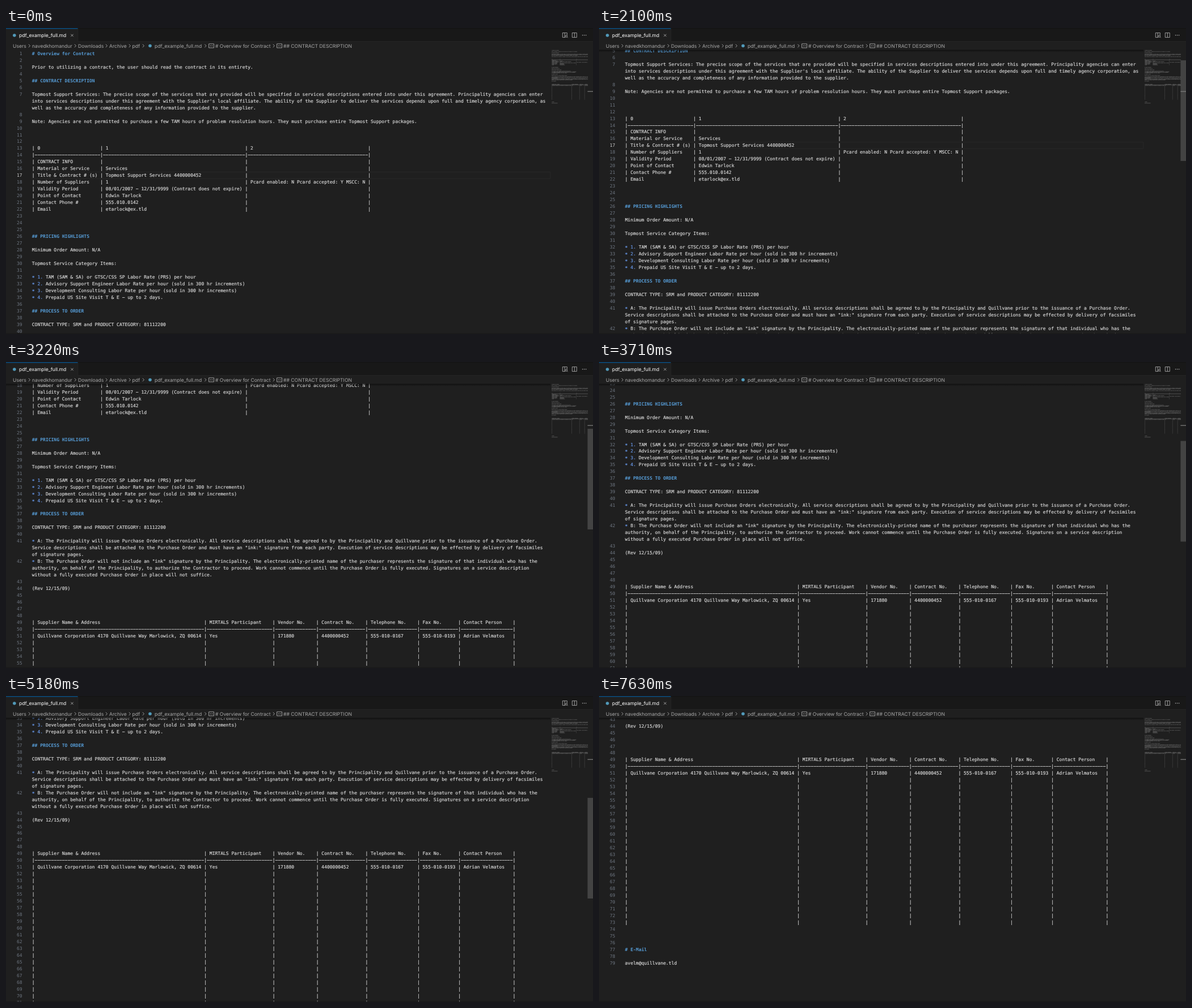
Animation, 1035 px wide and 541 px high, one loop 8260 ms. Source, as an HTML page:

```html
<!DOCTYPE html>
<html lang="en">
<head>
<meta charset="utf-8">
<title>Markdown editor scroll</title>
<style>
  html, body { margin: 0; width: 100%; height: 100%; overflow: hidden; background: #1f1f1f; }
  svg { display: block; width: 100%; height: 100%; }
  text { white-space: pre; text-rendering: geometricPrecision; }
  .mono {
    font: 8px "DejaVu Sans Mono", "Liberation Mono", monospace;
    color: #d8d8d8; fill: currentColor; stroke: currentColor; stroke-width: .18;
  }
  .mono tspan { fill: currentColor; stroke: currentColor; }
  .head { font-weight: bold; color: #569cd6; stroke: none; }
  .num { color: #6e7681; stroke: none; text-anchor: end; }
  .ui { font: 8.6px Inter, "Open Sans", sans-serif; fill: #a9a9a9; }
  .icon { fill: none; stroke: #bdbdbd; stroke-width: .8; }
</style>
</head>
<body>
<svg viewBox="0 0 1035 541" preserveAspectRatio="none">
  <defs>
    <clipPath id="view"><rect y="38.7" width="1025" height="503"/></clipPath>
    <clipPath id="mapView"><rect x="961" y="38" width="65" height="110"/></clipPath>
    <linearGradient id="fade" x2="0" y2="1">
      <stop stop-color="#000" stop-opacity=".5"/>
      <stop offset="1" stop-color="#000" stop-opacity="0"/>
    </linearGradient>
  </defs>
  <rect width="1035" height="541" fill="#1f1f1f"/>
  <g clip-path="url(#view)"><g id="page"></g></g>
  <rect id="shadow" y="38.7" width="960" height="4" fill="url(#fade)"/>
  <g id="map" clip-path="url(#mapView)" fill="none" stroke="#ccc" stroke-opacity=".36" stroke-width=".8"></g>
  <rect id="slider" x="1025.4" width="9.6" height="178" fill="#797979" fill-opacity=".4"/>
  <rect x="1025.4" y="111.6" width="9.6" height="1.2" fill="#808080"/>
  <g id="bar">
    <rect width="1035" height="24" fill="#181818"/>
    <rect y="23.5" width="1035" height=".7" fill="#2b2b2b"/>
    <rect width="126.5" height="24.3" fill="#1f1f1f"/>
    <rect x="126.5" width=".7" height="24" fill="#2b2b2b"/>
    <rect width="1035" height=".7" fill="#101010"/>
    <rect y=".4" width="126.5" height="1" fill="#0067b5"/>
    <path class="icon" d="M114.3 10.8l4.4 4.4m0-4.4l-4.4 4.4"/>
    <path class="icon" d="M981.3 8.6h8v4m-4.2-4v8m1.2 0h-5v-8"/>
    <circle class="icon" cx="988" cy="14.4" r="1.7"/>
    <path class="icon" d="M989.2 15.7l1.3 1.5M998.3 8.6h8v8h-8zm4 0v8"/>
    <g fill="#bdbdbd">
      <circle cx="1016.6" cy="12.8" r=".8"/><circle cx="1019.6" cy="12.8" r=".8"/><circle cx="1022.6" cy="12.8" r=".8"/>
    </g>
  </g>
  <rect y="540" width="1035" height="1" fill="#181818"/>
</svg>
<script>
const LOOP = 8260, STEP = 70;
const ROW = 11.975, LEFT = 45.8, BASE = 47.8;
const MAP_X = 962, MAP_Y = 39.6, MAP_CHAR = .556, MAP_ROW = 1.11;

const $ = id => document.getElementById(id);

function add(parent, tag, attrs = {}, text) {
  const el = document.createElementNS("http://www.w3.org/2000/svg", tag);
  for (const key in attrs) el.setAttribute(key, attrs[key]);
  if (text !== undefined) el.textContent = text;
  parent.appendChild(el);
  return el;
}

const tableRow = (widths, cells = []) =>
  widths.map((w, i) => ("| " + (cells[i] || "")).padEnd(w)).join("") + "|";
const ruleRow = widths => widths.map(w => "|" + "\u2212".repeat(w - 1)).join("") + "|";
const blanks = n => Array(n).fill("");

const info = [25, 53, 45];
const vendor = [63, 25, 16, 18, 19, 15, 20];

// A nested array is one numbered line wrapped over several rows.
const lines = [
  "# Overview for Contract", "",
  "Prior to utilizing a contract, the user should read the contract in its entirety.", "",
  "## CONTRACT DESCRIPTION", "",
  ["Topmost Support Services: The precise scope of the services that are provided will be specified in services descriptions entered into under this agreement. Principality agencies can enter",
   "into services descriptions under this agreement with the Supplier's local affiliate. The ability of the Supplier to deliver the services depends upon full and timely agency corporation, as",
   "well as the accuracy and completeness of any information provided to the supplier."], "",
  "Note: Agencies are not permitted to purchase a few TAM hours of problem resolution hours. They must purchase entire Topmost Support packages.",
  ...blanks(3),
  tableRow(info, ["0", "1", "2"]),
  ruleRow(info),
  ...[
    ["CONTRACT INFO"],
    ["Material or Service", "Services"],
    ["Title & Contract # (s)", "Topmost Support Services 4400000452"],
    ["Number of Suppliers", "1", "Pcard enabled: N Pcard accepted: Y MSCC: N"],
    ["Validity Period", "08/01/2007 \u2212 12/31/9999 (Contract does not expire)"],
    ["Point of Contact", "Edwin Tarlock"],
    ["Contact Phone #", "555.010.0142"],
    ["Email", "etarlock@ex.tld"]
  ].map(cells => tableRow(info, cells)),
  ...blanks(3),
  "## PRICING HIGHLIGHTS", "",
  "Minimum Order Amount: N/A", "",
  "Topmost Service Category Items:", "",
  "* 1. TAM (SAM & SA) or GTSC/CSS SP Labor Rate (PRS) per hour",
  "* 2. Advisory Support Engineer Labor Rate per hour (sold in 300 hr increments)",
  "* 3. Development Consulting Labor Rate per hour (sold in 300 hr increments)",
  "* 4. Prepaid US Site Visit T & E \u2212 up to 2 days.", "",
  "## PROCESS TO ORDER", "",
  "CONTRACT TYPE: SRM and PRODUCT CATEGORY: 81112200", "",
  ["* A: The Principality will issue Purchase Orders electronically. All service descriptions shall be agreed to by the Principality and Quillvane prior to the issuance of a Purchase Order.",
   "Service descriptions shall be attached to the Purchase Order and must have an \"ink:\" signature from each party. Execution of service descriptions may be effected by delivery of facsimiles",
   "of signature pages."],
  ["* B: The Purchase Order will not include an \"ink\" signature by the Principality. The electronically-printed name of the purchaser represents the signature of that individual who has the",
   "authority, on behalf of the Principality, to authorize the Contractor to proceed. Work cannot commence until the Purchase Order is fully executed. Signatures on a service description",
   "without a fully executed Purchase Order in place will not suffice."], "",
  "(Rev 12/15/09)",
  ...blanks(4),
  tableRow(vendor, ["Supplier Name & Address", "MIRTALS Participant", "Vendor No.", "Contract No.", "Telephone No.", "Fax No.", "Contact Person"]),
  ruleRow(vendor),
  tableRow(vendor, ["Quillvane Corporation 4170 Quillvane Way Marlowick, ZQ 00614", "Yes", "171880", "4400000452", "555-010-0167", "555-010-0193", "Adrian Velmatos"]),
  ...Array(22).fill(tableRow(vendor)),
  ...blanks(3),
  "# E-Mail", "",
  "avelm@quillvane.tld"
];

function drawRow(str, row) {
  if (!str) return;
  const isHead = str[0] === "#";
  const text = add($("page"), "text", { class: isHead ? "mono head" : "mono", x: LEFT, y: BASE + row * ROW });
  const mark = (str.match(/^\*( \d\.)?/) || [""])[0];
  if (mark) {
    add(text, "tspan", { color: "#6796e6", dy: 1 }, "*");
    add(text, "tspan", { color: "#6796e6", dy: -1 }, mark.slice(1) || " ");
    text.append(str.slice(Math.max(mark.length, 2)));
  } else text.textContent = str;

  const y = MAP_Y + row * MAP_ROW;
  const d = [...str.matchAll(/\S+/g)]
    .map(m => `M${MAP_X + m.index * MAP_CHAR} ${y}h${m[0].length * MAP_CHAR}`).join("");
  add($("map"), "path", { d });
}

function buildPage() {
  const current = 17;
  let row = 0;
  lines.forEach((line, i) => {
    const n = i + 1, y = BASE + row * ROW;
    if (n === current) {
      add($("page"), "rect", { x: LEFT, y: y - 8.6, width: 914, height: ROW - .6, fill: "none", stroke: "#282828" });
    }
    const num = add($("page"), "text", { class: "mono num", x: 28.6, y }, n);
    if (n === current) num.style.color = "#ccc";
    [].concat(line).forEach(str => drawRow(str, row++));
  });
}

function buildBar() {
  const bar = $("bar"), file = "pdf_example_full.md";
  const label = (x, y, str) => add(bar, "text", { class: "ui", x, y }, str);
  const dot = (x, y) => add(bar, "circle", { cx: x, cy: y, r: 2.8, fill: "#519aba" });
  dot(14.8, 13);
  label(23, 16, file).style.fill = "#fff";
  [[12, "Users"], [46, "navedkhomandur"], [127, "Downloads"], [182, "Archive"], [222.5, "pdf"], [262, file],
   [369, "# Overview for Contract"], [489, "## CONTRACT DESCRIPTION"]].forEach(([x, s]) => label(x, 34.6, s));
  dot(254, 31.5);
  [41, 122, 177, 218, 242, 351.5, 472].forEach(x =>
    add(bar, "path", { class: "icon", d: `M${x - 1.2} 28.8l2.7 2.7l-2.7 2.7` }));
  [357.6, 477.6].forEach(x =>
    add(bar, "path", { class: "icon", d: `M${x} 28h9v7h-9zm2 3.6h2.2m1 0h2` }));
}

// Each flick: start, duration, distance, decay power.
const flicks = [[1780, 1610, 207.3, 1.33], [2943, 1607, 141.2, 1.48], [4850, 1660, 230.5, 1.482]];

const scrollAt = t => flicks.reduce((sum, [start, span, dist, power]) => {
  const u = Math.min(1, Math.max(0, (t - start) / span));
  return sum + dist * (1 - (1 - u) ** power);
}, 0);

function sliderAlpha(t) {
  if (t < 1820 || t >= 7070) return 0;
  return t < 1890 || t >= 7000 ? .5 : 1;
}

function draw(time) {
  const t = Math.floor((time % LOOP) / STEP) * STEP;
  const y = scrollAt(t);
  $("page").setAttribute("transform", `translate(0 ${-y})`);
  $("shadow").setAttribute("opacity", y > 0 ? 1 : 0);
  $("slider").setAttribute("y", 39 + y * .3415);
  $("slider").setAttribute("opacity", sliderAlpha(t));
}

buildPage();
buildBar();
const begin = performance.now();
function tick() {
  draw(performance.now() - begin);
  requestAnimationFrame(tick);
}
draw(0);
tick();
</script>
</body>
</html>
```
